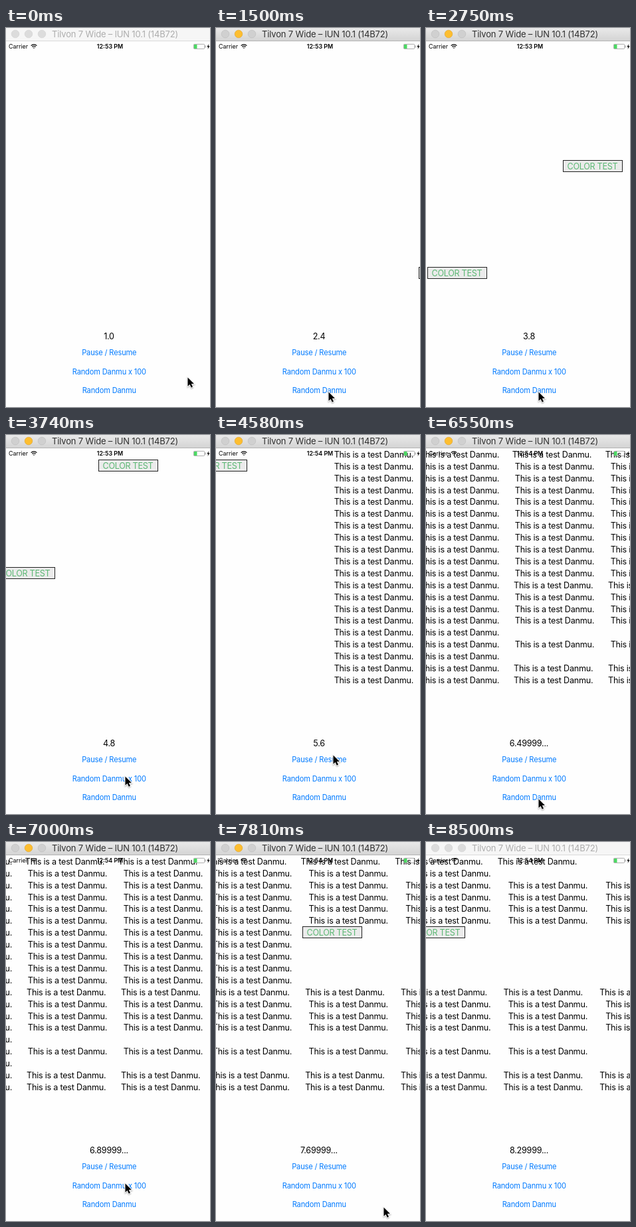
An HTML page with a canvas for the animation above (8.6 s loop, 307 by 571 pixels).

```html
<!DOCTYPE html>
<html lang="en">
<head>
<meta charset="utf-8">
<style>
  html, body { margin: 0; width: 100%; height: 100%; overflow: hidden; background: #fff; }
  canvas { display: block; }
</style>
</head>
<body>
<canvas width="307" height="571"></canvas>
<script>
const ctx = document.querySelector('canvas').getContext('2d');
const W = 307, H = 571, LOOP = 8600;
const ROWS = 20, ROW_HEIGHT = 17.9, SPEED = 20.2;
const PAUSED_AT = 51, HALT = 4580, RESUME = 5740;

// Pointer targets, and the steps during which it travels to each.
const PAUSE = [176, 482], HUNDRED = [179, 514], RANDOM = [169, 548], EXIT = [299, 573];
const MOVES = [
  [0, 11, RANDOM], [34, 39, HUNDRED], [44, 49, PAUSE], [52, 56, HUNDRED],
  [58, 61, RANDOM], [63, 66, HUNDRED], [67, 81, EXIT]
];

// The picture advances in steps and stands still while paused.
function stepAt(t) {
  return t < RESUME
    ? Math.floor(Math.min(t, HALT) / 88.7)
    : PAUSED_AT + 1 + Math.floor((t - RESUME) / 89);
}

function text(str, x, y, size, color, { spacing = 0, align = 'left', weight = 400 } = {}) {
  ctx.font = `${weight} ${size}px Inter, sans-serif`;
  ctx.letterSpacing = spacing + 'px';
  ctx.textAlign = align;
  ctx.fillStyle = color;
  ctx.fillText(str, x, y);
}

function rect(x, y, w, h, fill) {
  ctx.fillStyle = fill;
  ctx.fillRect(x, y, w, h);
}

function laneLength(row) {
  if (row < 2) return 5 - row;
  if (row > 5 && row < 11) return 3;
  if (row > 14 && row < 18) return 5 - 4 * Math.abs(row - 16);
  return 6;
}

function laneGap(row) {
  if (row === 0) return 138.5;
  return row === 11 || row > 17 ? 140.7 : 142.5;
}

function drawColorBox(row, x) {
  const left = Math.round(x), top = Math.round(19.5 + row * ROW_HEIGHT);
  rect(left, top, 90, 18, '#222');
  rect(left + 1, top + 1, 88, 16, '#ebebeb');
  text('COLOR TEST', left + 6.5, top + 13.5, 12.6, '#5cb874', { spacing: -0.3 });
}

function drawDanmu(n) {
  const played = n > PAUSED_AT ? n - 0.75 : n;
  const head = 178 - SPEED * (played - PAUSED_AT);
  for (let row = 0; row < ROWS; row++) {
    for (let k = 0; k < laneLength(row); k++) {
      const x = head + laneGap(row) * k + 0.45 * k * k;
      text('This is a test Danmu.', x - 0.3, 33.8 + row * ROW_HEIGHT, 12.6, '#000', { spacing: -0.22 });
    }
  }
  drawColorBox(19, head - 580);
  drawColorBox(10, head - 376);
  drawColorBox(1, head - 221);
  drawColorBox(6, head + 422);
}

function drawStatusBar(n) {
  text('Carrier', 4, 31, 8.9, '#000');
  text(n < 45 ? '12:53 PM' : '12:54 PM', 156.5, 31, 8.9, '#000', { align: 'center', weight: 600 });

  ctx.strokeStyle = '#000';
  ctx.lineWidth = 1.3;
  for (let r = 1; r < 7; r += 2.6) {
    ctx.beginPath();
    ctx.arc(42, 31, r, -Math.PI * 0.75, -Math.PI * 0.25);
    ctx.stroke();
  }

  ctx.strokeStyle = '#8a8a8a';
  ctx.lineWidth = 0.7;
  ctx.beginPath();
  ctx.roundRect(282.4, 24.4, 16.4, 7, 1.2);
  ctx.stroke();
  rect(283, 25, 4.5, 6, '#4cd964');
  rect(299.5, 26.5, 1, 3, '#8a8a8a');
  ctx.fillStyle = '#000';
  ctx.fill(new Path2D('M305.3 24 L302.4 28.4 H304.3 L303.5 32 L306.6 27.3 H304.6 Z'));
}

function drawTitleBar(active) {
  const bar = ctx.createLinearGradient(0, 0, 0, 20);
  bar.addColorStop(0, active ? '#e9e9e9' : '#f6f6f6');
  bar.addColorStop(1, active ? '#d3d3d3' : '#f6f6f6');
  rect(0, 0, W, 19, bar);
  rect(0, 19, W, 1, active ? '#b4b4b4' : '#dadada');
  for (let i = 0; i < 3; i++) {
    const lit = active && i === 1;
    ctx.beginPath();
    ctx.arc(14 + 20 * i, 9, 5.8, 0, 7);
    ctx.fillStyle = lit ? '#fdbe30' : active ? '#d0d0d0' : '#dcdcdc';
    ctx.fill();
    ctx.strokeStyle = lit ? '#e0a128' : active ? '#bababa' : '#d0d0d0';
    ctx.lineWidth = 0.6;
    ctx.stroke();
  }
  text('Tilvon 7 Wide – lUN 10.1 (14B72)', 69, 14, 13, active ? '#303030' : '#adadad', { spacing: -0.16 });
}

function drawControls(n) {
  // Rounding error shows up as trailing nines once the count nears six.
  const tenths = Math.floor(10.2 + 0.9 * Math.min(n, 81));
  const label = tenths < 59 ? (tenths / 10).toFixed(1) : ((tenths - 1) / 10).toFixed(1) + '9999...';
  text(label, 155, 468.5, 12.6, '#000', { spacing: -0.25, align: 'center' });
  ['Pause / Resume', 'Random Danmu x 100', 'Random Danmu'].forEach((name, i) =>
    text(name, 155.3, 493 + 28.5 * i, 11.1, '#007aff', { spacing: -0.16, align: 'center' }));
}

function pointerAt(n) {
  return MOVES.reduce(([x, y], [from, to, [tx, ty]]) => {
    const p = Math.min(1, Math.max(0, (n - from) / (to - from)));
    const eased = p * p * (3 - 2 * p);
    return [x + (tx - x) * eased, y + (ty - y) * eased];
  }, [273, 526]);
}

function drawPointer(n) {
  const [x, y] = pointerAt(n);
  const arrow = new Path2D('M0 0 V15 L3.5 11.8 L6 17.4 L8.5 16.3 L6.1 10.8 H10.8 Z');
  ctx.save();
  ctx.translate(Math.round(x) + 0.5, Math.round(y) + 0.5);
  ctx.scale(0.88, 0.88);
  ctx.shadowColor = 'rgba(0,0,0,.35)';
  ctx.shadowBlur = 2;
  ctx.shadowOffsetY = 1;
  ctx.strokeStyle = '#fff';
  ctx.lineWidth = 2;
  ctx.stroke(arrow);
  ctx.shadowColor = 'transparent';
  ctx.fillStyle = '#000';
  ctx.fill(arrow);
  ctx.restore();
}

const start = performance.now();
function frame() {
  const n = stepAt((performance.now() - start) % LOOP);
  rect(0, 0, W, H, '#fefefe');
  drawDanmu(n);
  drawStatusBar(n);
  drawTitleBar(n >= 16 && n < 82);
  drawControls(n);
  drawPointer(n);
  requestAnimationFrame(frame);
}
frame();
</script>
</body>
</html>
```
